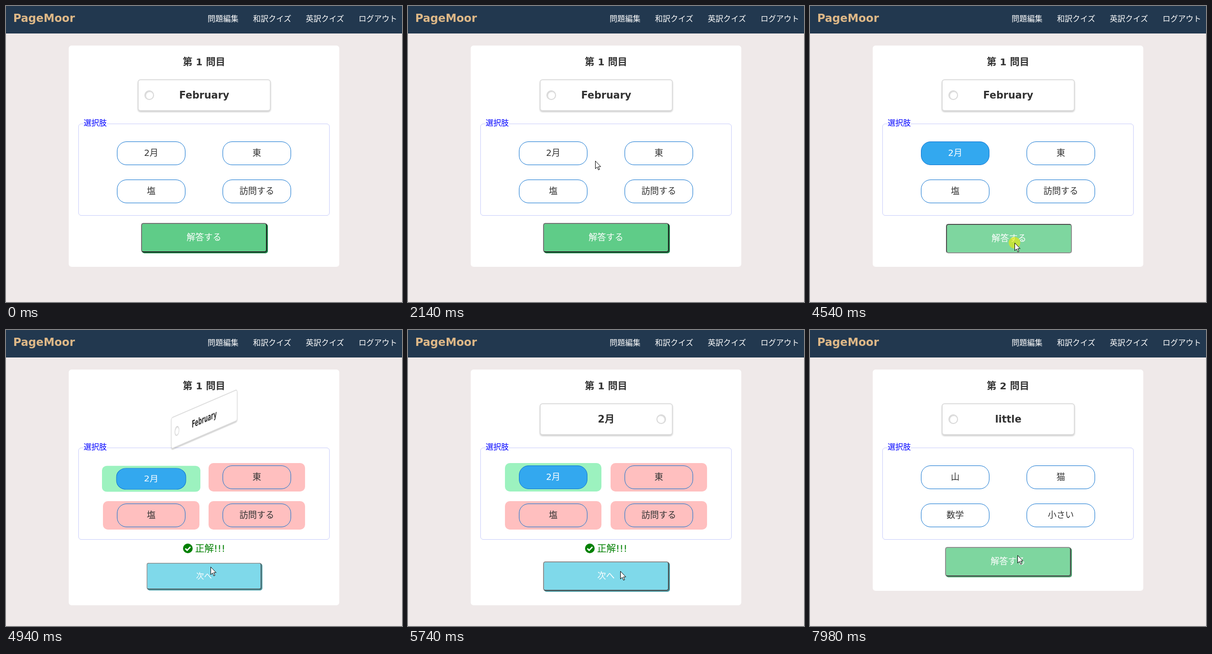
Animation, 821 px wide and 614 px high, one loop 8 s. Source, as an HTML page:

```html
<!DOCTYPE html>
<html lang="ja">
<head>
<meta charset="utf-8">
<style>
  html, body { margin: 0; width: 100%; height: 100%; overflow: hidden; background: #efe9e9; }
  body { position: relative; font: 18px "DejaVu Sans", "Noto Sans CJK JP", "Noto Sans CJK", sans-serif; color: #333; }
  div, svg { position: absolute; box-sizing: border-box; white-space: nowrap; text-align: center; }
  header { position: absolute; width: 821px; height: 57px; background: #22384f; color: #fff; line-height: 53px; }
  #logo { left: 15px; top: -1px; font-size: 22.7px; font-weight: bold; color: #deb887; }
  #nav { right: 10px; display: flex; gap: 30px; font-size: 16px; }
  #panel { left: 130px; top: 82px; width: 561px; background: #fff; border-radius: 6px; }
  #title { left: 130px; top: 96px; width: 561px; line-height: 40px; font-size: 20px; font-weight: bold; }
  #card { left: 273px; top: 152px; width: 276px; height: 66px; background: #fff; border: 2px solid #ddd;
    border-radius: 6px; box-shadow: 0 2px 3px rgba(0,0,0,.2); }
  #hole { left: 12px; top: 21px; width: 20px; height: 20px; border: 2px solid #d8d8d8; border-radius: 50%;
    box-shadow: inset 1px 1px 2px rgba(0,0,0,.2); }
  #word { width: 100%; line-height: 62px; font-size: 20.5px; font-weight: bold; }
  #choices { left: 150px; top: 244px; width: 521px; height: 191px; border: 1px solid #c8cdfa; border-radius: 6px; }
  #legend { left: 161px; top: 233px; line-height: 20px; font-size: 16px; color: blue; background: #fff; }
  .cell { width: 200px; height: 59px; border-radius: 10px; }
  .pill { left: 29px; top: 5px; width: 142px; height: 49px; line-height: 45px; border: 1px solid #0d72d0; border-radius: 20px; }
  #result { left: 392px; top: 438px; line-height: 31px; font-size: 19.5px; color: green; }
  #check { left: 367px; top: 443px; }
  #button { left: 280px; width: 261px; height: 61px; line-height: 56px; color: #fff; border: 2px solid; border-radius: 5px; }
  #ring { width: 24px; height: 24px; margin: -12px; border-radius: 50%; background: rgba(240,235,0,.6); }
  #cursor { overflow: visible; width: 1px; height: 1px; fill: #fff; stroke: #000; stroke-linejoin: round; }
</style>
</head>
<body>
<header>
  <div id="logo">PageMoor</div>
  <div id="nav"><span>問題編集</span><span>和訳クイズ</span><span>英訳クイズ</span><span>ログアウト</span></div>
</header>
<div id="panel"></div>
<div id="title"></div>
<div id="choices"></div>
<div id="legend">選択肢</div>
<div id="card"><div id="hole"></div><div id="word"></div></div>
<svg id="check" width="20" height="20"><circle cx="10" cy="10" r="10" fill="green"/><path d="M4.8 10.3 8.5 14 15.3 7" fill="none" stroke="#fff" stroke-width="2.7"/></svg>
<div id="result">正解!!!</div>
<div id="button"></div>
<div id="ring"></div>
<svg id="cursor">
  <path id="arrow" d="M.5.5V16.5L4.2 13 6.8 19 9.2 18 6.7 12.2H11.6Z"/>
  <path id="hand" d="M-2 1.5Q-2-.5 0-.5T2 1.5V8Q2 6 4 6.5T5.5 9Q6 7 8 8T9 10Q11 9 11 12V15Q11 18 9 20V22.5H-.5V20.5L-7 13.5Q-8 11-6 10.5T-2 13.5ZM2 8V11M5.5 9V12M9 10V13"/>
</svg>
<script>
const $ = id => document.getElementById(id);
const LOOP = 8000, REVEAL = 4640, NEXT = 6320;
const quizzes = [
  { word: 'February', options: ['2月', '東', '塩', '訪問する'] },
  { word: 'little', options: ['山', '猫', '数学', '小さい'] }
];
// time, x, y of the pointer tip
const pointerPath = [
  [1400, 425, 614], [1620, 385, 465], [1840, 345, 314], [2050, 345, 314], [2140, 388, 321],
  [2500, 455, 340], [2840, 520, 322], [2970, 535, 328], [3270, 535, 328], [3500, 340, 314],
  [3980, 340, 314], [4150, 375, 400], [4400, 424, 491], [5610, 424, 491], [5740, 440, 500],
  [7320, 440, 500], [7600, 415, 485], [7980, 430, 467], [8000, 430, 467]
];
// progress, scale x, scale y, rise in percent
const bounce = [
  [0, 1, 1, 0], [.15, 1.02, .94, 4], [.4, 1.02, .9, 6], [.5, 1, 1, 0],
  [.6, .99, 1.06, -16], [.8, 1, .92, 6], [1, 1, 1, 0]
];

const clamp = v => Math.min(1, Math.max(0, v));
const between = (t, a, b) => t >= a && t < b;
const inside = ([x, y], left, top, w, h) => between(x, left, left + w) && between(y, top, top + h);

function sample(keys, t) {
  const i = Math.max(1, keys.findIndex(k => k[0] >= t));
  const [a, b] = [keys[i - 1], keys[i]];
  const p = clamp((t - a[0]) / (b[0] - a[0]));
  return a.slice(1).map((v, n) => v + (b[n + 1] - v) * p);
}

const cells = [0, 1, 2, 3].map(i => {
  const cell = document.createElement('div'), pill = document.createElement('div');
  cell.className = 'cell';
  pill.className = 'pill';
  const x = i % 2 ? 420 : 201, y = i < 2 ? 276 : 355;
  cell.style.left = x + 'px';
  cell.style.top = y + 'px';
  cell.append(pill);
  $('card').before(cell);
  return { cell, pill, x: x + 29, y: y + 5 };
});

function drawCard(quiz, progress, fade) {
  const angle = Math.PI * progress;
  const skew = Math.PI / 10 * (1 - Math.abs(1 - 2 * progress));
  const back = progress > .5;
  $('card').style.transform = `matrix(${Math.cos(angle)},${-Math.tan(skew)},0,1,0,0)`;
  $('word').textContent = back ? quiz.options[0] : quiz.word;
  $('word').style.transform = back ? 'scaleX(-1)' : 'none';
  $('word').style.opacity = fade;
}

function drawOptions(t, quiz, pointer, answered, progress, fade) {
  let hovering = false;
  cells.forEach(({ cell, pill, x, y }, i) => {
    const hover = !answered && inside(pointer, x, y, 142, 49);
    const selected = i === 0 && between(t, 3730, NEXT);
    hovering ||= hover;
    pill.textContent = quiz.options[i];
    pill.style.background = selected ? '#33a8ef' : hover ? '#e1ecf9' : 'none';
    pill.style.color = selected ? '#fff' : '#333';
    pill.style.opacity = fade;
    cell.style.background = !answered ? 'none' : i ? '#ffbfbf' : '#9cf2bf';
    const [sx, sy, rise] = sample(bounce, answered && i === 0 ? progress : 0);
    cell.style.transform = `translateY(${rise}%) scale(${sx},${sy})`;
  });
  return hovering;
}

function drawButton(t, pointer, answered, progress, pressed) {
  const top = answered ? 480 : 450;
  const hover = inside(pointer, 280, top, 261, 61) && !between(t, NEXT, 7330);
  const style = $('button').style;
  const shift = pressed ? 2 : 0;
  $('button').textContent = answered ? '次へ' : '解答する';
  style.top = top + 'px';
  style.background = answered ? '#60d0e5' : '#5fcc88';
  style.opacity = hover ? .8 : 1;
  style.borderColor = pressed ? '#222 #767676 #767676 #222' : '#767676 #222 #222 #767676';
  style.boxShadow = pressed ? 'none' : `2px 2px 0 ${answered ? '#1c7f8c' : '#1d8548'}`;
  style.transform = `translate(${shift}px,${shift}px) scale(${answered ? .87 + .13 * progress : 1})`;
}

function render(t) {
  const pointer = sample(pointerPath, t);
  const answered = between(t, REVEAL, NEXT);
  const progress = answered ? clamp((t - REVEAL) / 900) : 0;
  const number = t < NEXT ? 1 : 2;
  const quiz = quizzes[number - 1];
  const fade = number === 1 ? 1 : clamp((t - NEXT) / 420);
  const pressed = between(t, 4510, REVEAL) || between(t, 6040, 6140);

  $('title').textContent = `第 ${number} 問目`;
  $('panel').style.height = (answered ? 489 : 459) + 'px';
  $('result').style.display = $('check').style.display = answered ? 'block' : 'none';
  drawCard(quiz, progress, fade);
  const hand = drawOptions(t, quiz, pointer, answered, progress, fade);
  drawButton(t, pointer, answered, progress, pressed);

  for (const id of ['ring', 'cursor']) {
    $(id).style.left = pointer[0] + 'px';
    $(id).style.top = pointer[1] + 'px';
  }
  $('cursor').style.display = t < 1410 ? 'none' : 'block';
  $('arrow').style.display = hand ? 'none' : 'inline';
  $('hand').style.display = hand ? 'inline' : 'none';
  $('ring').style.display = pressed || between(t, 3700, 3760) ? 'block' : 'none';
}

const start = performance.now();
function tick() {
  render((performance.now() - start) % LOOP);
  requestAnimationFrame(tick);
}
tick();
</script>
</body>
</html>
```
